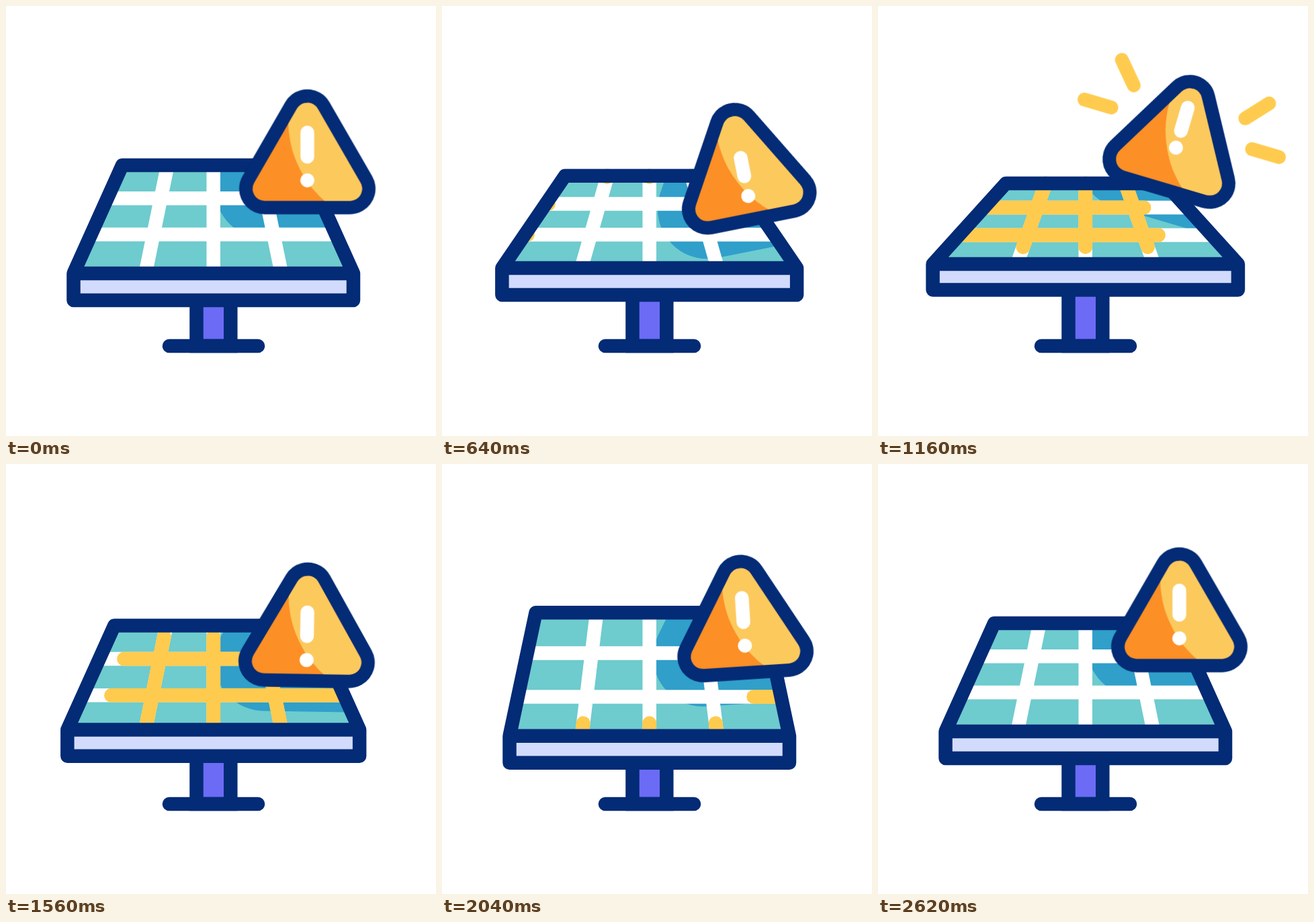
These frames come from a looping animation (640 px wide and 640 px high, 3 s). An HTML page without scripts:

```html
<!DOCTYPE html>
<html lang="en">
<head>
<meta charset="utf-8">
<title>Solar panel warning</title>
<style>
html, body { margin: 0; height: 100%; overflow: hidden; background: #fff; }
svg { display: block; width: 100vw; height: 100vh; }

:root {
  --navy: #032b76;
  --sun: #ffcb4f;
  --ease: cubic-bezier(.33, 0, .67, 1);
  --loop: 3s var(--ease) infinite;
}

/* Panel: every part blends between four poses */
.tilt { fill: none; animation: tilt var(--loop); }
.frame {
  --rest: path("M100.5 398L173 237H444.5L517 398V438H100.5V398H517");
  --lean: path("M85 386.8L187 259H430.5L532.5 386.8V427H85V386.8H532.5");
  --flat: path("M81.5 384L190.5 264H427L536 384V422.5H81.5V384H536");
  --tall: path("M100.5 406L134 218.6H483.5L517 406V446H100.5V406H517");
}
.face {
  --rest: path("M100.5 398L173 237H444.5L517 398Z");
  --lean: path("M85 386.8L187 259H430.5L532.5 386.8Z");
  --flat: path("M81.5 384L190.5 264H427L536 384Z");
  --tall: path("M100.5 406L134 218.6H483.5L517 406Z");
}
.row1 {
  --rest: path("M151 286.3H466.5");
  --lean: path("M156.3 297.7H461.2");
  --flat: path("M157.8 300H459.7");
  --tall: path("M122.9 280.8H494.6");
}
.row2 {
  --rest: path("M126.6 340H490.9");
  --lean: path("M121.9 340.5H495.6");
  --flat: path("M120.6 341H496.9");
  --tall: path("M110.9 347.5H506.6");
}
.middle {
  --rest: path("M308.75 237V398");
  --lean: path("M308.75 259V386.8");
  --flat: path("M308.75 264V384");
  --tall: path("M308.75 218.6V406");
}
.slant {
  --rest: path("M240.5 237L207.5 398");
  --lean: path("M248.5 259L207.2 386.8");
  --flat: path("M249.5 264L207 384");
  --tall: path("M228.5 218.6L208 406");
}
@keyframes tilt {
  0% { d: var(--rest); }
  6.67% { d: var(--rest); animation-timing-function: cubic-bezier(.4, 0, .6, .9); }
  28.67% { d: var(--lean); animation-timing-function: cubic-bezier(.3, .35, .6, 1); }
  40%, 41.33% { d: var(--flat); }
  62.23% { d: var(--tall); }
  86.67%, 100% { d: var(--rest); }
}

.grid { stroke: #fff; stroke-width: 20.5; }
.flow {
  stroke: var(--sun); stroke-width: 21; stroke-linecap: round;
  stroke-dasharray: 1 2; animation: flow var(--loop);
}
@keyframes flow {
  0%, 19.67% { stroke-dashoffset: 1; }
  46.67% { stroke-dashoffset: 0; }
  73.33%, 100% { stroke-dashoffset: -1; }
}

/* Warning sign */
.sign { animation: bob var(--loop), turn var(--loop); }
@keyframes bob {
  0%, 6.67% { translate: 448.5px 235.3px; }
  16.67% { translate: 450.5px 260.2px; animation-timing-function: cubic-bezier(.4, 0, .7, .6); }
  28.67% { translate: 448.3px 227.4px; animation-timing-function: cubic-bezier(.3, .5, .6, 1); }
  38.67% { translate: 443.5px 210.8px; }
  54% { translate: 448.2px 260px; }
  68% { translate: 449.3px 246.3px; animation-timing-function: cubic-bezier(.3, .4, .6, 1); }
  81.5%, 100% { translate: 448.5px 235.3px; }
}
@keyframes turn {
  0%, 8.8% { rotate: 0deg; }
  19.5% { rotate: -12deg; }
  39%, 40% { rotate: 16.5deg; }
  60.33% { rotate: -8deg; }
  75%, 100% { rotate: 0deg; }
}
.corners { stroke-linejoin: round; }

.bar { fill: none; stroke: #fff; stroke-width: 20.5; stroke-linecap: round; animation: bar 3s linear infinite; }
.dot { fill: #fff; animation: dot 3s linear infinite; }
@keyframes bar {
  0%, 6.67% { d: path("M0 -47V-11"); }
  13.33% { d: path("M0 -29V0"); }
  18% { d: path("M0 -27V1"); }
  28.67% { d: path("M0 -31.5V-3.5"); }
  38.67% { d: path("M0 -62V-26"); }
  52% { d: path("M0 -37V-1.5"); }
  64%, 100% { d: path("M0 -47V-11"); }
}
@keyframes dot {
  0%, 6.67% { cy: 24.2px; }
  13.33%, 18% { cy: 32px; }
  28.67% { cy: 23.7px; }
  38.67% { cy: 0px; }
  52% { cy: 34px; }
  64%, 100% { cy: 24.2px; }
}

.rays {
  fill: none; stroke: var(--sun); stroke-width: 20.5; stroke-linecap: round;
  animation: rays 3s linear infinite;
}
@keyframes rays {
  0%, 31.99% { opacity: 0; stroke-dasharray: 0 200; stroke-dashoffset: 0; }
  32% { opacity: 1; stroke-dasharray: 0 200; stroke-dashoffset: 0; }
  38.67% { stroke-dasharray: 42 200; stroke-dashoffset: -14; }
  43.33% { stroke-dasharray: 34 200; stroke-dashoffset: -28; }
  48.67% { opacity: 1; stroke-dasharray: 0 200; stroke-dashoffset: -82; }
  48.68%, 100% { opacity: 0; stroke-dasharray: 0 200; stroke-dashoffset: -82; }
}
</style>
</head>
<body>
<svg viewBox="0 0 640 640">
  <defs>
    <clipPath id="face"><path class="tilt face"/></clipPath>
    <path id="corners" class="corners" d="M0 -73.3L63.5 36.7H-63.5Z"/>
    <clipPath id="glow"><circle cx="131.5" cy="-65" r="160"/></clipPath>
  </defs>

  <!-- Stand -->
  <path d="M283.5 410V506H334.3V410" fill="#6c6bf5" stroke="var(--navy)" stroke-width="20.5"/>
  <path d="M243 506H375" stroke="var(--navy)" stroke-width="20.5" stroke-linecap="round"/>

  <!-- Panel -->
  <path class="tilt frame" style="fill:#d2dbfb"/>
  <path class="tilt face" style="fill:#6ecbce"/>
  <g clip-path="url(#face)">
    <g class="sign"><use href="#corners" fill="#309fca" stroke="#309fca" stroke-width="148"/></g>
  </g>
  <g class="grid">
    <path class="tilt row1"/>
    <path class="tilt row2"/>
    <path class="tilt middle"/>
    <path class="tilt slant"/>
    <path class="tilt slant" transform="translate(617.5) scale(-1 1)"/>
  </g>
  <g class="flow">
    <path class="tilt row1" pathLength="1"/>
    <path class="tilt row2" pathLength="1"/>
    <path class="tilt middle" pathLength="1"/>
    <path class="tilt slant" pathLength="1"/>
    <path class="tilt slant" pathLength="1" transform="translate(617.5) scale(-1 1)"/>
  </g>
  <path class="tilt frame" stroke="var(--navy)" stroke-width="20.5" stroke-linejoin="round"/>

  <!-- Warning sign -->
  <g class="sign">
    <path class="rays" d="M95 -30H185M-95 -30H-185M77.2 -60.5L136.9 -127.9M-77.2 -60.5L-136.9 -127.9"/>
    <use href="#corners" fill="var(--navy)" stroke="var(--navy)" stroke-width="76"/>
    <use href="#corners" fill="#fc8f25" stroke="#fc8f25" stroke-width="36"/>
    <g clip-path="url(#glow)"><use href="#corners" fill="#fcc95d" stroke="#fcc95d" stroke-width="36"/></g>
    <path class="bar"/>
    <circle class="dot" r="10.5"/>
  </g>
</svg>
</body>
</html>
```
